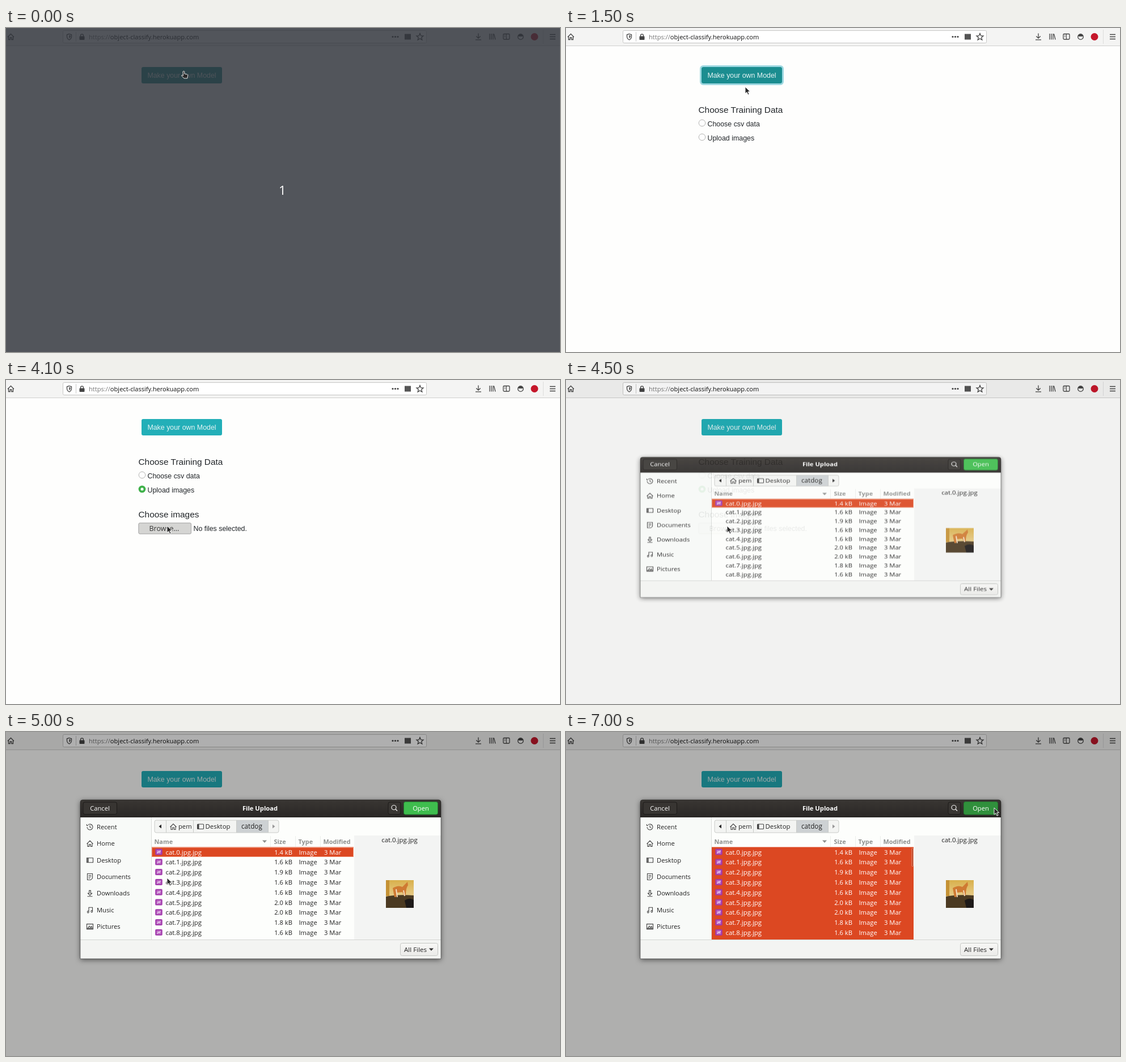
An HTML page for the animation above (8000 ms loop, 977x573 px).

```html
<!DOCTYPE html>
<html lang="en">
<head>
<meta charset="utf-8">
<title>Upload images</title>
<style>
html, body { margin: 0; width: 100%; height: 100%; overflow: hidden; background: #fefefd; }
svg { display: block; width: 977px; height: 573px; }
text { font: 11.2px "Open Sans", "Noto Sans", sans-serif; fill: #222; white-space: pre; }
.page text { font: 12.4px "Liberation Sans", Arial, sans-serif; fill: #212529; }
.page .head { font-size: 15.4px; }
.page .ui { font: 12.5px "Open Sans", "Noto Sans", sans-serif; fill: #333; }
.page .label { fill: #e6f4f4; }
.light text, text.light { fill: #fff; }
.bold { font-weight: 700; }
.cols text { font-weight: 700; font-size: 10.9px; fill: #8d8f8d; }
.file { font-size: 11.4px; }
.mid { text-anchor: middle; }
.end { text-anchor: end; }
.line { fill: none; stroke: #444; stroke-width: 1.3; }
.thin { fill: none; stroke: #444; stroke-width: 1.1; }

.a { animation: 8s step-end infinite; }
#count { animation-name: count; }
#button { animation-name: button; }
#ring { animation-name: ring; }
#options { animation-name: options; }
#checked { animation-name: checked; }
#focus { animation-name: focus; }
#picker { animation-name: picker; }
#press { animation-name: press; }
#dim { animation-name: dim; }
#dialog { animation-name: dialog; transform-origin: 449px 260.5px; }
#all { animation-name: all; }
#rowFocus { animation-name: rowFocus; }
#scroll { animation-name: scroll; }
#open { animation-name: open; }
#next { animation-name: next; }
#cursor { animation-name: move; }
#hand { animation-name: hand; }
#arrow { animation-name: arrow; }
.late { animation-name: late; }
.rest text { animation: rest 8s step-end infinite; }

@keyframes count { 0% { opacity: 1 } 1.25%, 100% { opacity: 0 } }
@keyframes button {
  0% { fill: #1b8d90 } 10% { fill: #18858a } 11.25% { fill: #1b8d90 }
  32.5% { fill: #1f9fa5 } 33.75%, 100% { fill: #23afb8 }
}
@keyframes ring { 0% { opacity: 0 } 10% { opacity: .5 } 11.25% { opacity: 1 } 32.5% { opacity: .4 } 33.75%, 100% { opacity: 0 } }
@keyframes options { 0% { opacity: 0 } 12.5%, 100% { opacity: 1 } }
@keyframes checked { 0% { opacity: 0 } 32.5% { opacity: .6 } 33.75%, 100% { opacity: 1 } }
@keyframes focus { 0% { opacity: 0 } 32.5% { opacity: 1 } 51.25%, 100% { opacity: 0 } }
@keyframes picker { 0% { opacity: 0 } 37.5%, 100% { opacity: 1 } }
@keyframes press { 0% { opacity: 0 } 51.25% { opacity: 1 } 53.75%, 100% { opacity: 0 } }
@keyframes dim {
  0% { opacity: 0 } 56.25% { opacity: .048 } 57.5% { opacity: .148 } 58.75% { opacity: .215 }
  60% { opacity: .262 } 61.25% { opacity: .295 } 62.5%, 100% { opacity: .315 }
}
@keyframes dialog {
  0% { opacity: 0; transform: scaleY(.883) } 56.25% { opacity: .91; transform: scaleY(.883) }
  57.5%, 100% { opacity: 1; transform: none }
}
@keyframes late { 0% { opacity: 0 } 57.5%, 100% { opacity: 1 } }
@keyframes next { 0% { fill: #333 } 57.5%, 100% { fill: #999 } }
@keyframes all { 0% { opacity: 0 } 70%, 100% { opacity: 1 } }
@keyframes rest { 0% { fill: #222 } 70%, 100% { fill: #fff } }
@keyframes rowFocus { 0% { opacity: 1 } 76.25%, 100% { opacity: 0 } }
@keyframes scroll { 0% { opacity: 0 } 76.25%, 100% { opacity: 1 } }
@keyframes open { 0% { fill: #3fbd4e } 86.25% { fill: #38a545 } 87.5%, 100% { fill: #30903c } }
@keyframes hand { 0% { opacity: 1 } 18.75%, 100% { opacity: 0 } }
@keyframes arrow { 0% { opacity: 0 } 18.75%, 100% { opacity: 1 } }
@keyframes move {
  0% { transform: translate(312px, 76px) }
  17.5% { transform: translate(317px, 86px) }
  18.75% { transform: translate(316px, 104px) }
  20% { transform: translate(304px, 127px) }
  21.25% { transform: translate(285px, 152px) }
  22.5% { transform: translate(264px, 174px) }
  23.75% { transform: translate(249px, 187px) }
  25% { transform: translate(241px, 193px) }
  42.5% { transform: translate(250px, 214px) }
  45% { transform: translate(263px, 230px) }
  46.25% { transform: translate(281px, 248px) }
  47.5% { transform: translate(292px, 257px) }
  48.75% { transform: translate(284px, 258px) }
  76.25% { transform: translate(299px, 254px) }
  77.5% { transform: translate(340px, 243px) }
  78.75% { transform: translate(402px, 226px) }
  80% { transform: translate(478px, 204px) }
  81.25% { transform: translate(558px, 181px) }
  82.5% { transform: translate(636px, 160px) }
  83.75% { transform: translate(700px, 143px) }
  85% { transform: translate(744px, 134px) }
  86.25% { transform: translate(760px, 132px) }
  87.5%, 100% { transform: translate(755px, 134px) }
}
</style>
</head>
<body>
<svg viewBox="0 0 977 573">
  <defs>
    <linearGradient id="bar" x2="0" y2="1"><stop stop-color="#393633"/><stop offset="1" stop-color="#2a2725"/></linearGradient>
    <linearGradient id="grey" x2="0" y2="1"><stop stop-color="#f7f7f5"/><stop offset="1" stop-color="#ebebe9"/></linearGradient>
    <linearGradient id="wall" x2="0" y2="1"><stop stop-color="#d9b04c"/><stop offset="1" stop-color="#f1dfb4"/></linearGradient>
    <filter id="shadow" x="-10%" y="-10%" width="120%" height="125%"><feDropShadow dx="0" dy="2" stdDeviation="5" flood-opacity=".55"/></filter>
    <clipPath id="listClip"><path d="M257 151H614V367H257Z"/></clipPath>
    <clipPath id="photoClip"><path d="M670 262h49v49h-49Z"/></clipPath>
    <path id="house" d="M-5.5 .5 0 -5 5.5 .5M-4 -.5V5H-1.3V1.5H1.3V5H4V-.5"/>
    <g id="fileIcon">
      <rect width="12.5" height="11" rx="1.8" fill="#a23aac"/>
      <rect x="2.5" y="2.3" width="7.5" height="6.4" fill="#c578cb"/>
      <path d="M3.2 8 5.8 4.8 7.2 6.3 9.2 3.2" fill="none" stroke="#fff"/>
    </g>
  </defs>

  <rect width="977" height="573" fill="#fefefd"/>

  <!-- browser bar -->
  <path d="M0 0H977V31H0Z" fill="#f4f4f3"/>
  <path d="M0 31.5H977" stroke="#cfcfce"/>
  <rect x="100.500" y="4.500" width="641" height="22" rx="2" fill="#fff" stroke="#c6c6c5"/>
  <path d="M123.500 7V24" stroke="#c8c8c8"/>
  <path d="M947.500 3V28" stroke="#dcdcdc"/>
  <use href="#house" x="8.500" y="15.500" class="line"/>
  <path class="line" d="M111.500 10.500 115.500 11.800V15Q115.500 19 111.500 21 107.500 19 107.500 15V11.800Z"/>
  <path d="M111.500 12.500V18.500Q113.700 17 113.700 14.500V13.200Z" fill="#444"/>
  <rect x="129.500" y="14.500" width="9" height="6.500" rx="1" fill="#444"/>
  <path class="line" d="M131.500 15V13.500a2.500 2.700 0 0 1 5 0V15"/>
  <text x="146" y="20" style="font-size:11.1px;fill:#777">https://<tspan fill="#111">object-classify.herokuapp.com</tspan></text>
  <g fill="#444"><circle cx="682" cy="15.500" r="1.600"/><circle cx="686.500" cy="15.500" r="1.600"/><circle cx="691" cy="15.500" r="1.600"/></g>
  <rect x="703" y="10.500" width="11" height="10" fill="#555"/>
  <path class="line" d="M730 9.500 731.700 13.700 736 14 732.700 16.800 733.800 21 730 18.700 726.200 21 727.300 16.800 724 14 728.300 13.700Z"/>
  <path class="line" d="M833 9.500V18M829.300 14.500 833 18.200 836.700 14.500M828 20.800H838"/>
  <path class="line" d="M853 10V20.500M856 10V20.500M859 10V20.500M860.500 10.500 863 20.500"/>
  <rect class="line" x="877" y="10.500" width="11" height="9.500" rx="1.500"/>
  <path class="thin" d="M882.500 10.500V20M879 13H881M879 15.500H881"/>
  <circle class="line" cx="907.500" cy="15.500" r="4.800"/>
  <path d="M903.500 13A4.500 4.500 0 0 1 911.500 13V15H903.500Z" fill="#444"/>
  <circle cx="932" cy="15.500" r="6.500" fill="#c5172b"/>
  <path class="line" d="M959 11.500H969M959 15.500H969M959 19.500H969"/>

  <!-- page -->
  <g class="page">
    <rect id="ring" class="a" x="237.500" y="67.500" width="145" height="32" rx="4.500" fill="none" stroke="#9dd8e1" stroke-width="3"/>
    <rect id="button" class="a" x="239" y="69" width="142" height="29" rx="3"/>
    <text class="label mid" x="310" y="88">Make your own Model</text>
    <g id="options" class="a">
      <text class="head" x="233.500" y="150">Choose Training Data</text>
      <text x="249.500" y="174">Choose csv data</text>
      <text x="249.500" y="199">Upload images</text>
      <g fill="#fefefe" stroke="#b4b4b2"><circle cx="240" cy="168" r="5.800"/><circle cx="240" cy="193" r="5.800"/></g>
      <g id="checked" class="a"><circle cx="240" cy="193" r="6.300" fill="#3fb24a"/><circle cx="240" cy="193" r="2.500" fill="#fff"/></g>
      <rect id="focus" class="a" x="233.500" y="186.500" width="13" height="13" fill="none" stroke="#3f9c48" stroke-dasharray="1 1"/>
    </g>
    <g id="picker" class="a">
      <text class="head" x="233.500" y="243">Choose images</text>
      <rect x="234" y="253" width="92.500" height="19" rx="2" fill="url(#grey)" stroke="#bcbcba"/>
      <rect id="press" class="a" x="234" y="253" width="92.500" height="19" rx="2" fill="#d5d5d3" stroke="#aaa"/>
      <text class="ui" x="252.500" y="267">Browse…</text>
      <text x="330.500" y="267">No files selected.</text>
    </g>
  </g>

  <rect id="dim" class="a" width="977" height="573"/>

  <!-- file dialog -->
  <g id="dialog" class="a">
    <path d="M131 401V124Q131 120 135 120H763Q767 120 767 124V401Z" fill="#fdfefc" filter="url(#shadow)"/>
    <path d="M131 151V124Q131 120 135 120H763Q767 120 767 124V151Z" fill="url(#bar)"/>
    <g fill="#383532" stroke="#1c1a18"><rect x="136" y="124" width="59.500" height="21.500" rx="3"/><rect x="674" y="124" width="22" height="21.500" rx="3"/></g>
    <rect id="open" class="a" x="701.500" y="123.500" width="60" height="22.500" rx="3" stroke="#257a30"/>
    <circle cx="684" cy="133.500" r="4" fill="none" stroke="#eee" stroke-width="1.200"/>
    <path d="M687 136.500 690 139.500" stroke="#eee" stroke-width="1.400"/>
    <g class="light">
      <text class="mid" x="165.500" y="138.500">Cancel</text>
      <text class="mid bold" x="448" y="138.500">File Upload</text>
      <text class="mid" x="731.500" y="138.500">Open</text>
    </g>

    <path d="M131 151H256V367H131Z" fill="#f8faf8"/>
    <path d="M256.500 151V367" stroke="#d9dbd8"/>
    <g id="places"></g>

    <rect x="262" y="156" width="219" height="22" rx="3" fill="#f3f4f2"/>
    <path d="M406 156H462V178H406Z" fill="#cdd1d3"/>
    <rect x="262" y="156" width="219" height="22" rx="3" fill="none" stroke="#c9cbc8"/>
    <path d="M282.500 156V178M330.500 156V178M406.500 156V178M462.500 156V178" stroke="#c9cbc8"/>
    <path d="M274 163.500V170.500L269.500 167Z" fill="#222"/>
    <path id="next" class="a" d="M470 163.500V170.500L474.500 167Z"/>
    <use href="#house" x="295" y="167.500" class="thin"/>
    <rect class="thin" x="337.500" y="163" width="11" height="8.500" rx="1"/>
    <path d="M337.500 163H340.500V171.500H337.500Z" fill="#444"/>
    <text x="304" y="171">pem</text>
    <text class="file" x="351.500" y="171">Desktop</text>
    <text style="font-size:11.700px" x="415" y="171">catdog</text>

    <g class="cols"><text x="261.500" y="197.500">Name</text><text x="472.500" y="197.500">Size</text><text x="515.500" y="197.500">Type</text><text x="559.500" y="197.500">Modified</text></g>
    <path d="M466.500 184V203M510.500 184V203M554.500 184V203" stroke="#eceeeb"/>
    <path d="M452 191.500H460L456 196Z" fill="#8d8f8d"/>

    <path d="M257 203.500H613V221H257Z" fill="#dc4822"/>
    <rect id="all" class="a" x="257" y="221" width="356" height="146" fill="#dc4822"/>
    <rect id="rowFocus" class="a" x="257.500" y="204.500" width="355" height="16" fill="none" stroke="#ef8d6f"/>
    <g id="files" clip-path="url(#listClip)"></g>
    <rect id="scroll" class="a" x="610" y="205.500" width="2.500" height="32" rx="1" fill="#b63c1c" stroke="#f2b6a2" stroke-width=".7"/>

    <path d="M614 183H767V367H614Z" fill="#f3f4f3"/>
    <text class="mid file" x="694" y="195">cat.0.jpg.jpg</text>
    <g clip-path="url(#photoClip)">
      <path d="M670 262h49v49h-49Z" fill="url(#wall)"/>
      <path d="M670 262H676V290H670Z" fill="#c59235"/>
      <path d="M670 291Q690 287 719 289V311H670Z" fill="#4b3a22"/>
      <path d="M703 298Q711 292 719 297V311H706Z" fill="#1d1a19"/>
      <path d="M682 276Q692 270 699 274L708 265 709 271Q705 276 705 289H702L699 283 690 284 688 292H685Z" fill="#cf7a32"/>
      <path d="M688 278 690 292M701 280 703 290" stroke="#f3dcc0" stroke-width="2"/>
    </g>

    <path d="M131 367H767V401H131Z" fill="#f3f4f2"/>
    <path d="M131 367.500H767" stroke="#d3d5d2"/>
    <rect x="695.500" y="373.500" width="66" height="22" rx="3" fill="url(#grey)" stroke="#c4c6c3"/>
    <text x="702" y="388.500" style="font-size:11.600px">All Files</text>
    <path d="M746 382.500H754L750 387Z" fill="#333"/>
    <path d="M131 401V124Q131 120 135 120H763Q767 120 767 124V401Z" fill="none" stroke="#000" stroke-opacity=".4"/>
  </g>

  <g id="count" class="a">
    <rect width="977" height="573" fill="#30333a" opacity=".83"/>
    <text class="mid light" x="487.500" y="295" style="font-size:22.500px">1</text>
  </g>

  <g id="cursor" class="a" fill="#2a2a2a" stroke="#fff" stroke-width=".9" stroke-linejoin="round">
    <path id="hand" class="a" d="M0 1Q1.500 -.6 2.800 1V5L7.500 6Q9 6.500 8.600 8.500L7.800 13H2L-2.500 8.600Q-2.500 7 -.8 7.500L.4 8.300Z"/>
    <path id="arrow" class="a" d="M0 0V12L2.900 9.500 5 14.200 7.100 13.200 5 8.700H8.800Z"/>
  </g>
</svg>
<script>
const byId = id => document.getElementById(id);

const places = {
  Recent: "M-5 0A5 5 0 1 0 -3 -4M-5.500 -5V-2.500H-3M0 -3V.5L2.500 1.500",
  Home: "M-5.500 .5 0 -5 5.500 .5M-4 -.5V5H-1.300V1.500H1.300V5H4V-.5",
  Desktop: "M-5.500 -4H5.500V4H-5.500ZM-4 -4V4M-3 -4V4",
  Documents: "M-4.500 -5.500H4.500V2.500L1.500 5.500H-4.500ZM-2.500 -2.500H2.500M-2.500 0H2.500M-2.500 2.500H0",
  Downloads: "M-1.300 -5V0H-3.500L0 3.500 3.500 0H1.300V-5ZM-4.500 5.300H4.500",
  Music: "M-2 3.500V-4.500H4.500V2.500M-4.500 3.500a1.300 1.300 0 1 0 2.500 0a1.300 1.300 0 1 0 -2.500 0M2 2.500a1.300 1.300 0 1 0 2.500 0a1.300 1.300 0 1 0 -2.500 0",
  Pictures: "M-5.500 -4.500H5.500V4.500H-5.500ZM-4 3 -1 -1 1 1.500 3 -.5 4 3Z"
};
byId("places").innerHTML = Object.entries(places).map(([name, icon], i) => {
  const y = 168 + 29.35 * i;
  return `<path class="thin" transform="translate(148 ${y})" d="${icon}"/>
    <text x="160" y="${y + 4}">${name}</text>`;
}).join("");

const sizes = [1.4, 1.6, 1.9, 1.6, 1.6, 2, 2, 1.8, 1.6, 1.7];
byId("files").innerHTML = sizes.map((size, i) => {
  const y = 216.6 + 17.78 * i;
  return `<g class="${i ? "rest" : "light"}">
    <use href="#fileIcon" x="263.200" y="${y - 10}" class="${i ? "a late" : ""}"/>
    <text class="file" x="281.500" y="${y}">cat.${i}.jpg.jpg</text>
    <text class="end" x="505" y="${y}">${size.toFixed(1)} kB</text>
    <text x="516.500" y="${y}">Image</text>
    <text x="561" y="${y}">3 Mar</text></g>`;
}).join("");
</script>
</body>
</html>
```
